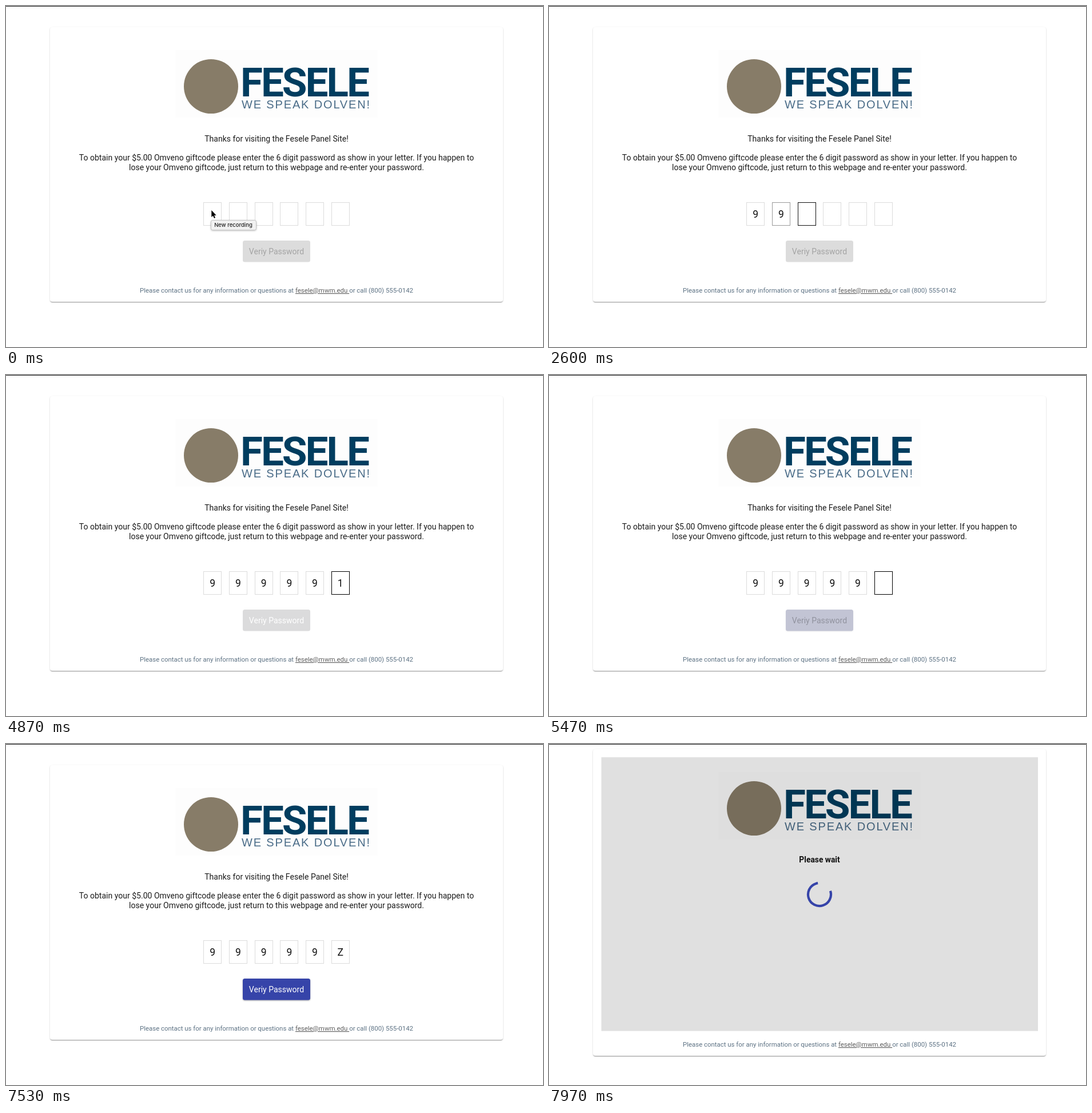
An HTML page for the animation above (8000 ms loop, 939 by 596 pixels).

```html
<!DOCTYPE html>
<html lang="en">
<head>
<meta charset="utf-8">
<title>Password entry</title>
<style>
  html, body { margin: 0; width: 100%; height: 100%; overflow: hidden; background: #fff; }
  #card {
    position: absolute; left: 77px; width: 792px; border-radius: 4px; background: #fff;
    box-shadow: 0 2px 1px -1px rgba(0,0,0,.22), 0 1px 1px rgba(0,0,0,.16), 0 1px 3px rgba(0,0,0,.14);
  }
  svg { position: absolute; left: 0; top: 0; display: block; }
  text { font: 14.04px Roboto, sans-serif; text-anchor: middle; fill: #1c1c1c; white-space: pre; }
  .brand { font-size: 71px; font-weight: 700; letter-spacing: -3px; text-anchor: start; fill: #003d5f; }
  .slogan { font: 20px "Liberation Sans", sans-serif; letter-spacing: 1.85px; text-anchor: start; fill: #4a6c88; }
  .foot { font-size: 11.43px; fill: #5c7183; }
  .mail { fill: #5f5f5f; text-decoration: underline; }
  .digit { font-size: 17.5px; fill: #111; }
  .tip { font: 500 9.5px Inter, sans-serif; fill: #222; }
  .wait { font-size: 13.8px; font-weight: 700; fill: #111; }
</style>
</head>
<body>
<div id="card"></div>
<svg width="939" height="596" viewBox="0 0 939 596">
  <rect width="939" height="1" fill="#222"/>
  <g id="logo">
    <rect x="296" y="77" width="354" height="118" fill="#fdfdfd"/>
    <circle cx="358.5" cy="140.5" r="47.5" fill="#877c68"/>
    <text class="brand" x="410" y="158">FESELE</text>
    <text class="slogan" x="412" y="179">WE SPEAK DOLVEN!</text>
  </g>
  <g id="intro">
    <text x="473" y="237">Thanks for visiting the Fesele Panel Site!</text>
    <text x="473" y="270.3">To obtain your $5.00 Omveno giftcode please enter the 6 digit password as show in your letter. If you happen to</text>
    <text x="473" y="287">lose your Omveno giftcode, just return to this webpage and re-enter your password.</text>
  </g>
  <g id="entry">
    <g id="boxes"></g>
    <rect id="button" x="414" y="410" width="118" height="37.5" rx="3.5"/>
    <text id="label" x="473" y="434">Veriy Password</text>
  </g>
  <text id="foot" class="foot" x="473" y="501">Please contact us for any information or questions at <tspan class="mail">fesele@mwm.edu </tspan>or call (800) 555-0142</text>
  <rect id="shade" x="91.5" width="763.5" fill-opacity=".12"/>
  <text id="wait" class="wait" x="473" y="207">Please wait</text>
  <circle id="spinner" cx="473" cy="263" r="20" fill="none" stroke="#3644a9" stroke-width="4.2" pathLength="360"/>
  <g id="tooltip">
    <rect x="358.5" y="374.5" width="79" height="17" rx="3" fill="#f1f1f1" stroke="#c4c4c4" style="filter: drop-shadow(0 1px 1.5px rgba(0,0,0,.25))"/>
    <text class="tip" x="397.5" y="386">New recording</text>
  </g>
  <path id="cursor" d="M359.3 357v12l2.7-2.4 2 4.3 2-.9-2-4.1 3.6-.2z" stroke="#fff" stroke-width="1" paint-order="stroke"/>
</svg>
<script>
const LOOP = 8000, LOADING = 7572, WAITING = 7830;
const $ = id => document.getElementById(id);
const clamp = x => Math.max(0, Math.min(1, x));

const typed = [[0, ''], [2000, '9'], [2370, '99'], [2870, '999'], [3020, '9999'], [3170, '99999'],
  [4870, '999991'], [5330, '99999'], [5870, '9999'], [6630, '99999'], [7030, '99999Z']];
const focus = [[0, -1], [70, 0], [2000, 1], [2370, 2], [2870, 3], [3020, 4], [3170, 5],
  [5870, 4], [6630, 5], [7130, -1]];
const enabled = [[0, false], [4870, true], [5330, false], [7030, true], [LOADING, false]];

const current = (events, t) => events.filter(e => e[0] <= t).pop();

function bezier(p, x1, y1, x2, y2) {
  const curve = (s, a, b) => 3 * (1 - s) ** 2 * s * a + 3 * (1 - s) * s * s * b + s ** 3;
  let low = 0, high = 1;
  for (let i = 0; i < 20; i++) {
    const mid = (low + high) / 2;
    if (curve(mid, x1, x2) < p) low = mid; else high = mid;
  }
  return curve(low, y1, y2);
}

// Border strength, moving toward focused or idle over 300 ms
function focusLevel(box, t) {
  let level = 0;
  focus.forEach(([start, target], i) => {
    const end = Math.min(t, i + 1 < focus.length ? focus[i + 1][0] : LOOP);
    if (end > start) level = clamp(level + (target === box ? 1 : -1) * (end - start) / 300);
  });
  return (level * level * (3 - 2 * level)) ** 0.6;
}

$('boxes').innerHTML = Array.from({ length: 6 }, (_, i) => {
  const x = 345.3 + i * 44.7;
  return `<rect x="${Math.round(x) + .5}" y="343.5" width="31" height="40" fill="none"/>
    <text class="digit" x="${x + 15.9}" y="370"></text>`;
}).join('');
const frames = [...$('boxes').querySelectorAll('rect')];
const digits = [...$('boxes').querySelectorAll('text')];

const show = (id, visible) => $(id).style.display = visible ? '' : 'none';
const shift = (id, dy) => $(id).setAttribute('transform', `translate(0 ${dy})`);

function drawButton(t) {
  const [since, on] = current(enabled, t);
  const eased = since ? bezier(clamp((t - since) / 400), .25, .8, .25, 1) : 1;
  const level = on ? eased : 1 - eased;
  const mix = [54, 68, 169].map(c => Math.round(220 + (c - 220) * level));
  $('button').setAttribute('fill', `rgb(${mix})`);
  $('button').style.filter = level ? `drop-shadow(0 1.5px 1.2px rgba(0,0,0,${.35 * level}))` : '';
  $('label').style.fill = on ? '#fff' : 'rgba(0,0,0,.26)';
}

function drawSpinner(t) {
  const elapsed = Math.max(0, t - LOADING);
  const arc = 18 + 270 * bezier(clamp(elapsed / 500), .35, 0, .25, 1);
  $('spinner').setAttribute('stroke-dasharray', `${arc} 360`);
  $('spinner').setAttribute('transform', `rotate(${elapsed * .18 - 90} 473 263)`);
}

function draw(t) {
  const loading = t >= LOADING, waiting = t >= WAITING;
  const height = waiting ? 535.5 : loading ? 357 : 480.5;
  const top = 277.2 - height / 2;
  $('card').style.top = top + 'px';
  $('card').style.height = height + 'px';
  shift('logo', waiting ? -28 : loading ? 62 : 0);
  shift('entry', loading ? -62 : 0);
  shift('foot', waiting ? 28 : loading ? -62 : 0);
  $('shade').setAttribute('y', top + 13.7);
  $('shade').setAttribute('height', height - 57);

  show('intro', !loading);
  show('entry', !waiting);
  show('shade', loading);
  show('spinner', loading);
  show('wait', waiting);
  show('cursor', t < 2000);
  $('tooltip').style.opacity = 1 - clamp((t - 30) / 300);

  const value = current(typed, t)[1];
  digits.forEach((digit, i) => {
    digit.textContent = value[i] || '';
    const grey = Math.round(220 * (1 - focusLevel(i, t)));
    frames[i].setAttribute('stroke', `rgb(${grey},${grey},${grey})`);
  });
  drawButton(t);
  drawSpinner(t);
}

function tick() {
  draw(performance.now() % LOOP);
  requestAnimationFrame(tick);
}
tick();
</script>
</body>
</html>
```
